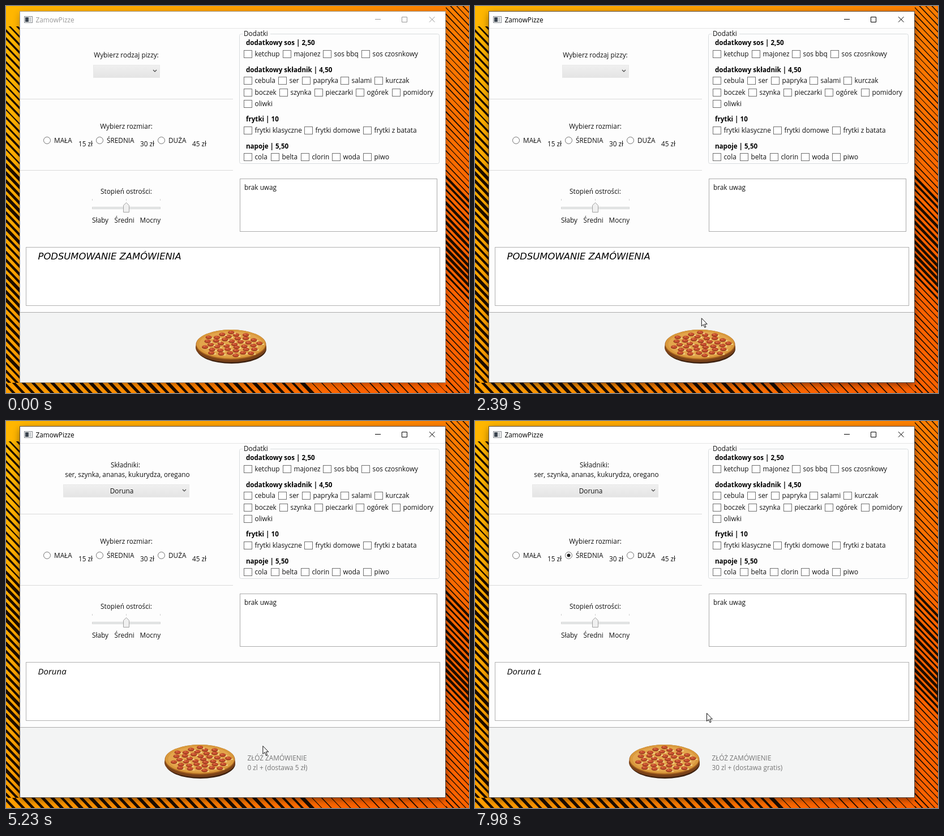
An HTML page that plays this animation: 818x684 px, repeating every 8 s.

```html
<!DOCTYPE html>
<html lang="pl">
<head>
<meta charset="utf-8">
<title>ZamowPizze</title>
<style>
html, body { margin: 0; width: 100%; height: 100%; overflow: hidden; background: #ff9a00; }
svg { display: block; }
text { font: 11.8px "Open Sans", "Noto Sans", sans-serif; fill: #111; white-space: pre; }
.b { font-weight: 700; font-size: 11.6px; fill: #000; }
.sum { font: italic 500 15px "Open Sans", sans-serif; fill: #000; }
.head { font: italic 16.4px "DejaVu Sans", sans-serif; fill: #000; }
.grey { fill: #777; }
.mid { text-anchor: middle; }
</style>
</head>
<body>
<svg id="stage" width="818" height="684" viewBox="0 0 818 684">
  <defs>
    <linearGradient id="desk" x1="0" y1="0" x2="1" y2=".55">
      <stop offset="0" stop-color="#ffb700"/><stop offset=".5" stop-color="#ff9900"/><stop offset="1" stop-color="#ff6200"/>
    </linearGradient>
    <linearGradient id="gray" x2="0" y2="1"><stop stop-color="#f0f0f0"/><stop offset="1" stop-color="#e4e4e4"/></linearGradient>
    <linearGradient id="blue" x2="0" y2="1"><stop stop-color="#ecf4fc"/><stop offset="1" stop-color="#dcecfc"/></linearGradient>
    <linearGradient id="down" x2="0" y2="1"><stop stop-color="#daecfc"/><stop offset="1" stop-color="#c4e0fc"/></linearGradient>
    <filter id="soft" x="-10%" y="-10%" width="120%" height="120%"><feGaussianBlur stdDeviation="7"/></filter>
    <clipPath id="west"><rect y="36" width="25" height="630"/></clipPath>
    <clipPath id="south"><rect y="666" width="777" height="18"/></clipPath>
    <clipPath id="east"><rect x="777" width="41" height="684"/></clipPath>
    <clipPath id="drop"><rect id="dropBox" x="150" y="127" width="130" height="0"/></clipPath>
  </defs>
  <rect width="818" height="684" fill="url(#desk)"/>
  <g id="stripes" stroke="#1c0c00"></g>
  <rect id="shade" x="25" y="14" width="752" height="655" filter="url(#soft)"/>
  <rect id="frame" x="24.5" y="9.5" width="752" height="656" fill="#fdfdfd"/>
  <rect x="25" y="10" width="751" height="29" fill="#fff"/>
  <g id="ui"></g>
  <g id="pizza"></g>
  <g id="live"></g>
  <g id="popup" clip-path="url(#drop)"></g>
  <path id="cursor" d="M.5.5V14.6L3.7 11.6 6 16.9 8.1 16 5.9 10.9H10.4Z" fill="#fff" stroke="#111"/>
</svg>
<script>
const $ = id => document.getElementById(id);
const NS = 'http://www.w3.org/2000/svg';
const LOOP = 8000, OPEN = 3180, PICK = 3870, SIZE = 6420;

function add(parent, tag, attrs, text) {
  const el = document.createElementNS(NS, tag);
  set(el, attrs);
  if (text) el.textContent = text;
  return parent.appendChild(el);
}
function set(el, attrs) {
  for (const k in attrs) el.setAttribute(k, attrs[k]);
}
const ui = $('ui'), live = $('live'), popup = $('popup');
const label = (x, y, s, cls = '', parent = ui) => add(parent, 'text', { x, y, class: cls }, s);
const box = (x, y, width, height, stroke, fill = 'none', parent = ui) =>
  add(parent, 'rect', { x, y, width, height, stroke, fill });
const line = (d, stroke, parent = ui) => add(parent, 'path', { d, stroke, fill: 'none' });

let seed = 7;
const rand = () => (seed = seed * 16807 % 2147483647) / 2147483647;

// diagonal strokes along one edge; at(p) gives the start point, width(p) the weight
function hatch(edge, end, gap, at, width) {
  const g = add($('stripes'), 'g', { 'clip-path': `url(#${edge})` });
  for (let p = -60; p < end; p += gap)
    add(g, 'path', { d: `M${at(p)}l60 63`, 'stroke-width': width(p) * (.7 + .6 * rand()) });
}

function drawDesk() {
  hatch('west', 690, 14, p => [-5, p], p => p < 250 ? 3 : 4.6);
  hatch('south', 777, 17, p => [p, 660], p => p < 520 ? 5 : 1.4);
  hatch('east', 690, 11.5, p => [772, p], p => p > 290 && p < 480 ? 3.8 : 1.5);
  add($('stripes'), 'path', { d: 'M817.5 450V495', 'stroke-width': 2 });
}

function drawWindow() {
  // app icon
  box(32.5, 18.5, 14, 11, '#8a8f94', '#f4f4f4');
  add(ui, 'rect', { x: 34, y: 20, width: 6, height: 8, fill: '#3c4650' });
  add(ui, 'rect', { x: 41, y: 20, width: 3, height: 8, fill: '#c3c8cc' });
  line('M25 39.5H776', '#e4e4e4');
  line('M25 164.5H401M25 290.5H401', '#dadada');

  label(212.5, 217, 'Wybierz rozmiar:', 'mid');
  [[85, 'MAŁA', 128, '15 zł'], [178, 'ŚREDNIA', 237, '30 zł'], [287, 'DUŻA', 329, '45 zł']]
    .forEach(([x, name, px, price]) => { label(x, 242, name); label(px, 248, price); });

  label(212.5, 332, 'Stopień ostrości:', 'mid');
  line('M152.5 341V344M212.5 341V344M272.5 341V344', '#cfcfcf');
  box(152.5, 355.5, 120, 3, '#d6d6d6', '#e7eaea');
  add(ui, 'path', { d: 'M207.5 364.5V352.5L212.5 347.5 217.5 352.5V364.5Z', fill: '#f0f0f0', stroke: '#a2a2a2' });
  label(152, 383, 'Słaby'); label(191.5, 383, 'Średni'); label(236.5, 383, 'Mocny');

  line('M418 49.5H415.5Q412.5 49.5 412.5 52.5V275.5Q412.5 278.5 415.5 278.5H762.5Q765.5 278.5 765.5 275.5V52.5Q765.5 49.5 762.5 49.5H467', '#d8dcde');
  label(420, 53, 'Dodatki');
  [[69, 'dodatkowy sos | 2,50'], [116.5, 'dodatkowy składnik | 4,50'], [204, 'frytki | 10'], [251.5, 'napoje | 5,50']]
    .forEach(([y, s]) => label(424, y, s, 'b'));
  const rows = [
    [85, 420, 'ketchup', 489, 'majonez', 560, 'sos bbq', 628, 'sos czosnkowy'],
    [132, 420, 'cebula', 481, 'ser', 523, 'papryka', 591, 'salami', 651, 'kurczak'],
    [153, 420, 'boczek', 483, 'szynka', 545, 'pieczarki', 618, 'ogórek', 682, 'pomidory'],
    [173, 420, 'oliwki'],
    [220, 420, 'frytki klasyczne', 527, 'frytki domowe', 631, 'frytki z batata'],
    [267, 420, 'cola', 468, 'belta', 521, 'clorin', 576, 'woda', 631, 'piwo']
  ];
  for (const [y, ...items] of rows)
    for (let i = 0; i < items.length; i += 2) {
      box(items[i] + .5, y - 6.5, 14, 13, '#707070', '#fff');
      label(items[i] + 19.5, y + 4.2, items[i + 1]);
    }

  box(413.5, 305.5, 348, 93, '#ababab', '#fff');
  label(421, 324.5, 'brak uwag');
  box(35.5, 426.5, 731, 103, '#b2b2b2', '#fff');
  add(ui, 'rect', { x: 25, y: 541, width: 751, height: 124, fill: '#f3f4f4' });
  line('M25 541.5H776', '#acacac');
}

function drawPizza() {
  const disc = (cx, cy, rx, ry, fill) => add($('pizza'), 'ellipse', { cx, cy, rx, ry, fill });
  disc(1, 6, 61.5, 26, '#3d2110');
  disc(0, 3.5, 62.5, 26, '#7a4219');
  disc(0, -1.5, 62, 26.5, '#a8621f');
  disc(0, -2.5, 61, 25.5, '#d9993c');
  disc(0, -2.5, 56, 22.5, '#e3a54c');
  const COUNT = 38;
  for (let i = 0; i < COUNT; i++) {
    const r = Math.sqrt((i + .5) / COUNT), a = i * 2.39996;
    const x = 53 * r * Math.cos(a), y = 21.5 * r * Math.sin(a) - 2.5;
    disc(x + 6, y + 2, 2.6, 1.2, '#f5d588');
    disc(x, y + .5, 5.6, 3.1, '#94371c');
    disc(x, y - .2, 4.7, 2.3, '#c9502f');
    disc(x - 1.2, y - .8, 1.4, .7, '#e08858');
  }
}

drawDesk();
drawWindow();
drawPizza();

const title = label(52.5, 28.5, 'ZamowPizze', '', live);
const buttons = line('M652 23.5H662M699.5 19.5H708.5V28.5H699.5ZM748 19L757.5 28.5M757.5 19L748 28.5', '#000', live);
const combo = box(0, 0, 0, 22, '#ddd', '#eee', live);
const chevron = line('', '#333', live);
const choice = label(204.5, 128, '', 'mid', live);
const head = label(0, 0, '', 'mid', live);
const parts = label(214.5, 99, '', 'mid', live);
const summary = label(56.5, 448, '', 'head', live);
const order = label(0, 600, 'ZŁÓŻ ZAMÓWIENIE', 'grey', live);
const cost = label(0, 617, '', 'grey', live);
const radios = [72.5, 165.5, 274.5].map(cx =>
  add(live, 'circle', { cx, cy: 237.5, r: 6, fill: '#fff', stroke: '#707070' }));
const dot = add(live, 'circle', { cx: 165.5, cy: 237.5, r: 3, fill: '#212121' });

add(popup, 'rect', { x: 158, y: 130, width: 117, height: 84, fill: '#000', opacity: .13 });
box(154.5, 126.5, 117, 83, '#868686', '#fff', popup);
const mark = box(156.5, 128.5, 113, 19, '#a8d2f8', '#e2f0fc', popup);
['Doruna', 'Wiejska', 'Serowa', 'Ostra'].forEach((s, i) => label(213, 142.5 + i * 20, s, 'mid', popup));

// time, x, y of the pointer tip
const path = [
  [620, 751, 659], [800, 600, 470], [1060, 235, 112], [1140, 222, 110], [1420, 309, 411], [1590, 309, 411],
  [1610, 311, 412], [1810, 406, 569], [2350, 406, 569], [2620, 260, 190], [2800, 160, 25], [2930, 113, 62],
  [3120, 219, 106], [3170, 219, 106], [3280, 224, 97], [3660, 231, 142], [4380, 231, 142],
  [5020, 455, 575], [5210, 455, 575], [5230, 453.5, 574], [5760, 222, 200], [6030, 196, 224],
  [6200, 111, 231], [6410, 189, 237], [6550, 189, 237], [6840, 334, 443], [7300, 455, 569],
  [7520, 455, 569], [7690, 457, 591], [7970, 409, 516], [8000, 409, 516]
];

// monotone cubic: no overshoot, stops at turning points
function glide(t, k) {
  let i = 0;
  while (i < path.length - 2 && t > path[i + 1][0]) i++;
  const step = j => path[j] && path[j + 1] ? (path[j + 1][k] - path[j][k]) / (path[j + 1][0] - path[j][0]) : 0;
  const slope = (a, b) => a * b > 0 ? 2 * a * b / (a + b) : 0;
  const p = path[i], q = path[i + 1], h = q[0] - p[0];
  const u = Math.max(0, Math.min(1, (t - p[0]) / h)), v = 1 - u;
  const m0 = slope(step(i - 1), step(i)), m1 = slope(step(i), step(i + 1));
  return p[k] * (1 + 2 * u) * v * v + m0 * h * u * v * v + q[k] * u * u * (3 - 2 * u) - m1 * h * u * u * v;
}

const ramp = (t, a, b) => Math.max(0, Math.min(1, (t - a) / (b - a)));

function render(t) {
  const x = glide(t, 1), y = glide(t, 2);
  const over = (l, top, r, b) => t >= 620 && x >= l && x <= r && y >= top && y <= b;
  const active = t >= 1970, picked = t >= PICK, sized = t >= SIZE, open = t >= OPEN && !picked;

  set($('cursor'), { transform: `translate(${x} ${y})`, visibility: t >= 620 ? 'visible' : 'hidden' });
  set($('shade'), { opacity: .3 + .2 * ramp(t, 1970, 2190) });
  set($('frame'), { stroke: active ? '#5c5148' : '#a09a90' });
  title.style.fill = active ? '#000' : '#999';
  set(buttons, { stroke: active ? '#000' : '#999' });

  const left = picked ? 101 : 154, top = picked ? 112 : 104, right = picked ? 324 : 272;
  const hot = over(left, top, right, top + 23);
  set(combo, {
    x: left + .5, y: top + .5, width: right - left - 1,
    fill: `url(#${open ? 'down' : hot ? 'blue' : 'gray'})`,
    stroke: open ? '#7fb4ea' : hot ? '#deebf9' : '#e8e8e8'
  });
  set(chevron, { d: `M${right - 12} ${top + 9}l3 3 3-3`, stroke: hot || open ? '#000' : '#444', 'stroke-width': 1.2 });
  choice.textContent = picked ? 'Doruna' : '';
  head.textContent = picked ? 'Składniki:' : 'Wybierz rodzaj pizzy:';
  set(head, { x: picked ? 211 : 212.5, y: picked ? 82 : 91 });
  parts.textContent = picked ? 'ser, szynka, ananas, kukurydza, oregano' : '';

  summary.textContent = sized ? 'Doruna L' : picked ? 'Doruna' : 'PODSUMOWANIE ZAMÓWIENIA';
  set(summary, { class: picked ? 'sum' : 'head' });

  const px = sized ? 334.5 : picked ? 342.5 : 397.5;
  set($('pizza'), { transform: `translate(${px} 600)` });
  order.style.display = cost.style.display = picked ? '' : 'none';
  set(order, { x: px + 84 });
  set(cost, { x: px + 84 });
  cost.textContent = sized ? '30 zl + (dostawa gratis)' : '0 zl + (dostawa 5 zł)';

  [[66, 118], [159, 228], [268, 320]].forEach(([l, r], i) =>
    set(radios[i], { stroke: over(l, 229, r, 246) ? '#5593ff' : '#707070' }));
  dot.style.display = sized ? '' : 'none';

  popup.style.display = open ? '' : 'none';
  set($('dropBox'), { height: 90 * (1 - (1 - ramp(t, OPEN, OPEN + 180)) ** 2) });
  mark.style.display = over(155, 128, 269, 148) ? '' : 'none';
}

const start = performance.now();
function tick() {
  render((performance.now() - start) % LOOP);
  requestAnimationFrame(tick);
}
render(0);
requestAnimationFrame(tick);
</script>
</body>
</html>
```
